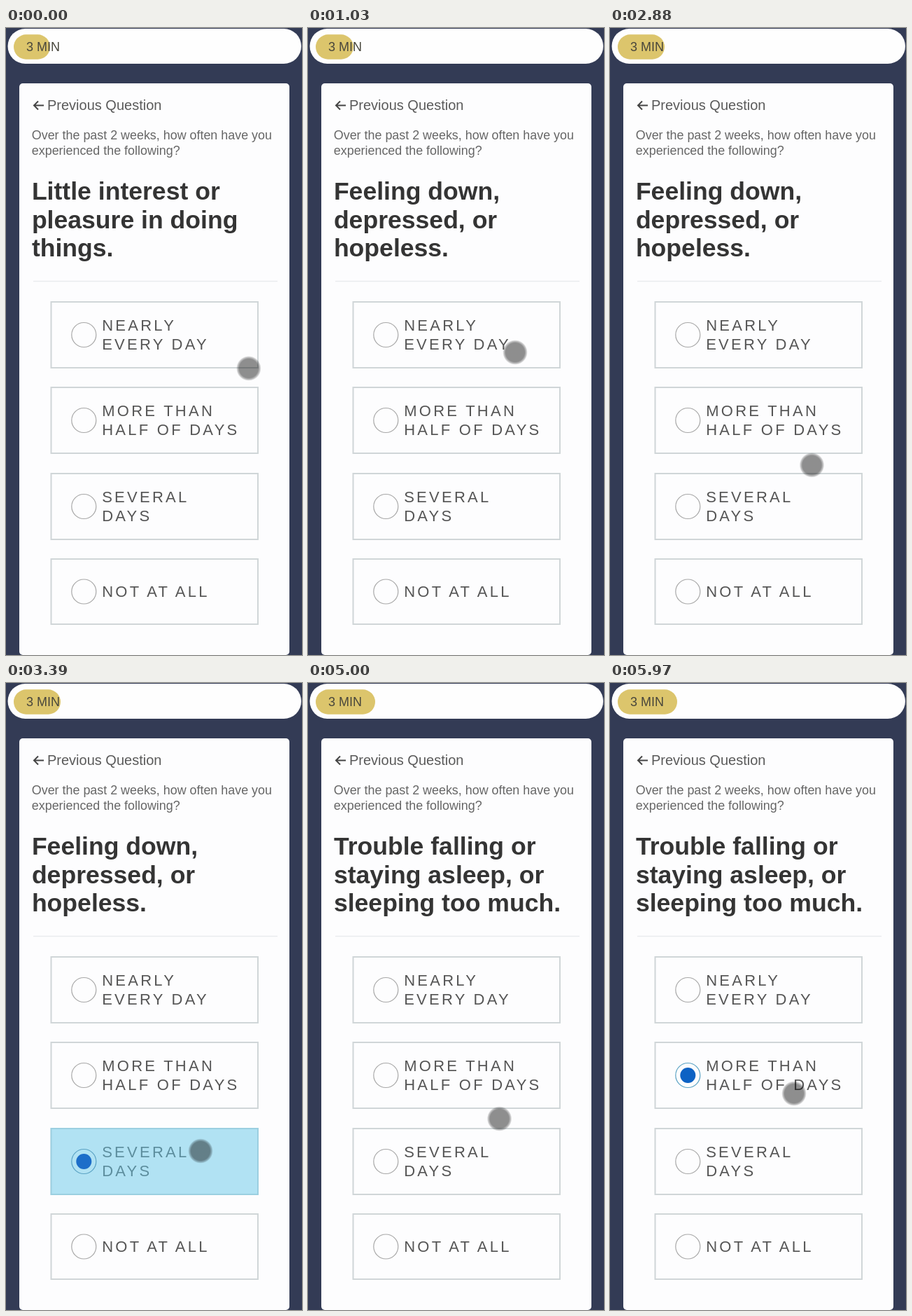
An HTML page for the animation above (6 s loop, 423x895 px).

```html
<!DOCTYPE html>
<html lang="en">
<head>
<meta charset="utf-8">
<title>Questionnaire</title>
<style>
  html, body { margin: 0; width: 100%; height: 100%; overflow: hidden; background: #333b55; }
  svg { display: block; width: 100%; height: 100%; font-family: "Liberation Sans", Arial, sans-serif; }
  #page { filter: blur(.4px); }
  .heading { font-size: 35.6px; font-weight: 700; fill: #343434; }
  .intro { font-size: 17.9px; fill: #666; }
  .back { font-size: 20px; fill: #5a5a5a; }
  .label { font-size: 22px; letter-spacing: 3.25px; fill: #555; }
</style>
</head>
<body>
<svg id="stage" viewBox="0 0 423 895">
  <defs>
    <radialGradient id="soft">
      <stop offset=".76" stop-opacity=".44"/>
      <stop offset=".9" stop-opacity=".22"/>
      <stop offset="1" stop-opacity="0"/>
    </radialGradient>
  </defs>
  <rect width="423" height="895" fill="#333b55"/>
  <g id="page">
    <rect x="2.5" y="1" width="419.5" height="50" rx="25" fill="#fefefe"/>
    <rect id="bar" x="11" y="9.3" height="35.4" rx="17.7" fill="#dcc56c"/>
    <text x="29" y="33" font-size="18" fill="#48463c">3 MIN</text>
    <rect x="19" y="79" width="386" height="816" rx="5" fill="#fdfdfe"/>
    <path d="M54 110.5H40M46 104.5L40 110.5L46 116.5" fill="none" stroke="#444" stroke-width="2"/>
    <text class="back" x="59" y="117">Previous Question</text>
    <text class="intro" x="36.8" y="158.5">Over the past 2 weeks, how often have you</text>
    <text class="intro" x="36.8" y="180.5">experienced the following?</text>
    <g id="heading"></g>
    <path d="M39 361.5H388" stroke="#e9ebed" stroke-width="1.5"/>
    <g id="options"></g>
    <circle id="cursor" r="17.8" fill="url(#soft)"/>
  </g>
</svg>
<script>
const LOOP = 6000;
const NS = "http://www.w3.org/2000/svg";
const $ = id => document.getElementById(id);

const questions = [
  { at: 0, lines: ["Little interest or", "pleasure in doing", "things."] },
  { at: 910, lines: ["Feeling down,", "depressed, or", "hopeless."] },
  { at: 3610, lines: ["Trouble falling or", "staying asleep, or", "sleeping too much."] }
];
const options = [
  { y: 391, h: 94, lines: ["NEARLY", "EVERY DAY"] },
  { y: 513, h: 94, lines: ["MORE THAN", "HALF OF DAYS"] },
  { y: 636, h: 94, lines: ["SEVERAL", "DAYS"] },
  { y: 758, h: 93, lines: ["NOT AT ALL"] }
];
const clicks = [
  { option: 0, at: 570, until: 910 },
  { option: 2, at: 3290, until: 3610 },
  { option: 1, at: 5690, until: LOOP }
];
const moves = [
  { from: 0, to: 390, x: 296, y: 463 },
  { from: 1880, to: 2330, x: 297, y: 543 },
  { from: 2760, to: 3030, x: 278, y: 668 },
  { from: 4760, to: 5360, x: 267, y: 590 },
  { from: 5390, to: 5420, x: 263, y: 586 }
];
const growth = [{ at: 910, by: 15 }, { at: 3610, by: 18 }];

const clamp = v => Math.max(0, Math.min(1, v));
const easeOut = p => Math.sin(p * Math.PI / 2);

// cubic-bezier(.25, .1, .25, 1)
function ease(p) {
  const curve = (a, b, s) => 3 * a * s * (1 - s) ** 2 + 3 * b * s * s * (1 - s) + s ** 3;
  let lo = 0, hi = 1;
  for (let i = 0; i < 24; i++) {
    const mid = (lo + hi) / 2;
    if (curve(.25, .25, mid) < p) lo = mid; else hi = mid;
  }
  return curve(.1, 1, lo);
}

function add(parent, tag, attrs, text) {
  const el = document.createElementNS(NS, tag);
  for (const k in attrs) el.setAttribute(k, attrs[k]);
  if (text) el.textContent = text;
  return parent.appendChild(el);
}

for (const q of questions) {
  q.el = add($("heading"), "g", {});
  q.lines.forEach((line, i) =>
    add(q.el, "text", { class: "heading", x: 36.9, y: 245 + 40.5 * i }, line));
}

for (const o of options) {
  const g = add($("options"), "g", {});
  const cy = o.y + o.h / 2;
  const box = { x: 64.5, y: o.y, width: 295.5, height: o.h };
  add(g, "rect", { ...box, fill: "none", stroke: "#d0d6d8", "stroke-width": 2 });
  const first = cy + (o.lines.length > 1 ? -6 : 7.5);
  o.lines.forEach((line, i) =>
    add(g, "text", { class: "label", x: 137.2, y: first + 27 * i }, line));
  o.flash = add(g, "rect", {
    x: 63.5, y: o.y - 1, width: 297.5, height: o.h + 2, fill: "#63c6e6"
  });
  o.ring = add(g, "circle", { cx: 111.3, cy, r: 17.5, fill: "none", "stroke-width": 1.2 });
  o.dot = add(g, "circle", { cx: 111.3, cy, r: 11, fill: "#0d62c4" });
}

// Quick rise and fall of the highlight after a click
const pulse = ms => ms < 100 ? clamp(ms / 100) : 1 - clamp((ms - 100) / 110);

function draw(t) {
  questions.forEach((q, i) => {
    const next = questions[i + 1];
    const on = t >= q.at && (!next || t < next.at);
    q.el.setAttribute("display", on ? "inline" : "none");
  });

  options.forEach((o, i) => {
    const click = clicks.find(c => c.option === i && t >= c.at && t < c.until);
    const glow = click ? pulse(t - click.at) : 0;
    o.flash.setAttribute("opacity", glow * .5);
    o.dot.setAttribute("display", click ? "inline" : "none");
    o.dot.setAttribute("fill-opacity", 1 - glow * .1);
    o.ring.setAttribute("stroke", click ? "#5ba3c4" : "#a8a8a8");
  });

  const width = growth.reduce((w, g) => w + g.by * ease(clamp((t - g.at) / 1000)), 52);
  $("bar").setAttribute("width", width);

  let x = 347, y = 486;
  for (const m of moves) {
    const p = clamp((t - m.from) / (m.to - m.from));
    x += (m.x - x) * p;
    y += (m.y - y) * easeOut(p);
  }
  $("cursor").setAttribute("transform", `translate(${x} ${y})`);
}

const start = performance.now();
function tick() {
  draw((performance.now() - start) % LOOP);
  requestAnimationFrame(tick);
}
tick();
</script>
</body>
</html>
```
